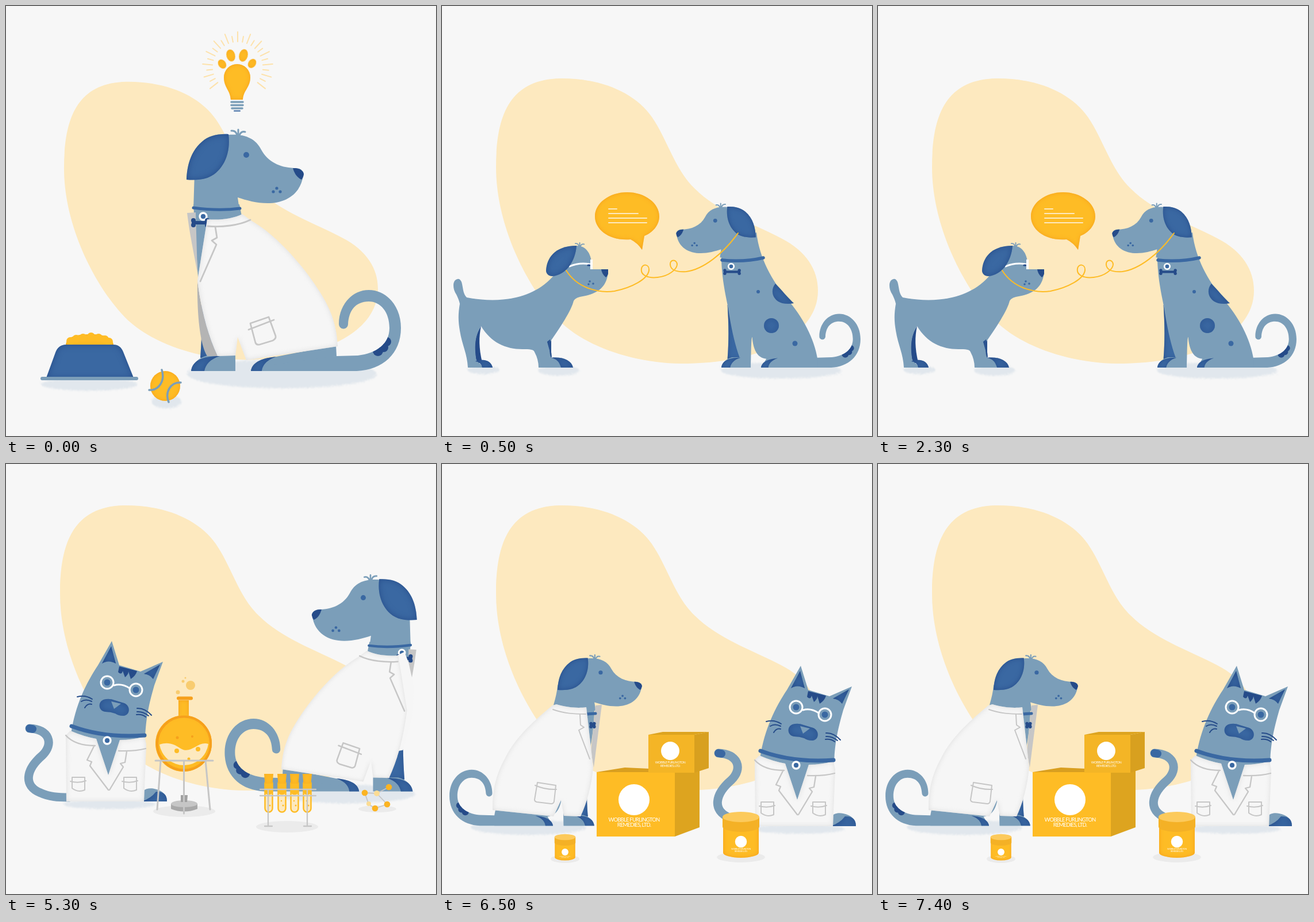
An HTML page for the animation above (8000 ms loop, 748 by 748 pixels).

```html
<!DOCTYPE html>
<html lang="en">
<head>
<meta charset="utf-8">
<title>Pets at work</title>
<style>
html, body { margin: 0; width: 100%; height: 100%; overflow: hidden; background: #f7f7f7; }
svg { display: block; width: 100vw; height: 100vh; }
text { font: 400 9.5px Lato, sans-serif; letter-spacing: -.8px; fill: #fff; text-anchor: middle; }
</style>
</head>
<body>
<svg id="stage" viewBox="0 0 748 748"></svg>
<script>
const BLUE = '#7b9eb9', DARK = '#3a68a2', NAVY = '#254b89', GOLD = '#febc25', AMBER = '#f6a01c',
      CREAM = '#fde9bf', WHITE = '#f6f6f6', GREY = '#c6c6c6', SHADE = '#e1e7ed';
const NIGHT = 'filter="url(#night)"', GLOW = 'filter="url(#glow)"', MIST = 'filter="url(#mist)"';

// Drawing helpers
const p = (d, fill, extra = '') => `<path d="${d}" fill="${fill}" ${extra}/>`;
const l = (d, color, w = 2, extra = '') =>
  `<path d="${d}" fill="none" stroke="${color}" stroke-width="${w}" stroke-linecap="round" stroke-linejoin="round" ${extra}/>`;
const e = (x, y, rx, ry, fill, extra = '') => `<ellipse cx="${x}" cy="${y}" rx="${rx}" ry="${ry}" fill="${fill}" ${extra}/>`;
const c = (x, y, r, fill, extra) => e(x, y, r, r, fill, extra);
const g = (transform, ...parts) => `<g transform="${transform}">${parts.join('')}</g>`;
const ground = (x, y, rx, ry) => e(x, y, rx, ry, SHADE, 'filter="url(#dust)"');

// Soft inner shading
const inner = (id, color, blur) => `<filter id="${id}" color-interpolation-filters="sRGB">
  <feFlood flood-color="${color}"/><feComposite in2="SourceAlpha" operator="out"/><feGaussianBlur stdDeviation="${blur}"/>
  <feComposite in2="SourceAlpha" operator="in" result="s"/>
  <feMerge><feMergeNode in="SourceGraphic"/><feMergeNode in="s"/></feMerge></filter>`;

const tailShape = 'M426 635H610C655 633 687 605 687 560C687 522 662 494 631 494C602 494 579 520 579 553A8 8 0 0 0 595 554C596 530 608 514 631 514C652 514 667 533 667 560C667 588 645 604 612 608L575 609L460 612C440 616 428 624 426 635Z';

const defs = `<defs>${inner('night', NAVY, 6)}${inner('glow', AMBER, 3.5)}${inner('mist', '#dcdcdc', 4)}
  <filter id="dust" x="-20%" y="-40%" width="140%" height="180%"><feTurbulence type="fractalNoise" baseFrequency=".7" result="n"/>
  <feDisplacementMap in="SourceGraphic" in2="n" scale="12"/><feGaussianBlur stdDeviation="1"/></filter>
  <clipPath id="tail"><path d="${tailShape}"/></clipPath></defs>`;

const blob = transform => p('M205 126C275 125 335 150 365 193C392 232 405 285 440 318C480 358 545 380 590 404C635 427 654 460 654 495C654 570 560 622 415 622C330 621 240 590 196 539C150 488 94 385 94 280C94 190 118 128 205 126Z',
  CREAM, `transform="${transform}"`);

const hair = l('M404 226V215M402 225Q400 216 392 217M406 225Q409 217 416 219', BLUE, 3);

const dogHead = hair
  + p('M326 354L328 290C335 250 350 226 387 224C415 222 434 230 444 250C456 272 478 282 506 282C514 283 519 289 517 295C512 328 486 343 455 343C436 343 418 338 403 333L406 354Z', BLUE)
  + p('M387 223C392 260 375 290 350 299C337 303 325 303 314 302C315 278 321 253 341 236C352 226 368 222 387 223Z', DARK, NIGHT)
  + p('M499 282C510 281 518 287 518 293Q517 299 514 302C506 298 502 292 499 282Z', NAVY)
  + c(418, 259, 5, DARK) + c(471, 317, 2.6, DARK) + c(465, 323, 2.6, DARK) + c(477, 323, 2.6, DARK);

const dogLegs = p(tailShape, BLUE)
  + `<g clip-path="url(#tail)">${c(662, 584, 8, NAVY)}${c(657, 594, 8, NAVY)}${c(647, 600, 9, NAVY)}</g>`
  + p('M338 470L352 530L385 612H338C342 560 341 520 338 470Z', DARK, NIGHT)
  + p('M350 608H399V635H322C324 622 335 612 350 608Z', BLUE);

const dogToes = p('M322 635C324 618 340 609 372 609C355 614 347 624 345 635Z', DARK, NIGHT)
  + p('M426 635C428 622 440 613 470 610C452 616 446 626 445 635Z', DARK, NIGHT);

const dogBody = p('M322 340L414 280C422 350 455 405 494 455C535 500 566 560 574 611V635H426L440 612C415 610 405 585 403 555C400 555 400 600 399 635H345L370 609C352 560 345 510 338 470C330 430 324 400 322 354Z', BLUE);

const bone = (x, y, w) => l(`M${x} ${y}h${w}`, NAVY, 6)
  + [0, w].map(d => c(x + d, y - 4, 4, NAVY) + c(x + d, y + 4, 4, NAVY)).join('');
const tag = (x, y, r) => c(x, y, r, 'none', `stroke="#fff" stroke-width="${r * .55}"`) + c(x, y, r * .65, DARK);

// Seated dog in a coat; the front is either an open lining or a closed flap
const coatDog = front => dogLegs + p('M575 609L574 590L455 613L460 625Z', BLUE) + dogToes + dogHead
  + p('M326 345H406L413 380L334 472Z', BLUE)
  + l('M326 351Q370 357 407 352', DARK, 5)
  + p('M315 360L330 359L333 464C326 425 320 400 315 360Z', GREY)
  + tag(343, 366, 6) + bone(326, 377, 24) + front
  + p('M350 371C372 373 395 370 411 362L426 373C470 398 515 450 541 490C566 527 575 555 577 592L418 616L403 576L399 608L368 609C350 570 340 530 333 478Z', WHITE, MIST)
  + l('M351 383C375 385 405 382 425 372M364 384L367 403L358 408L366 415L338 479', GREY, 2.8)
  + l('M425 552L434 586Q436 590 441 589L464 582Q470 579 469 574L457 541ZM422 563L466 546', GREY, 2.8);

const cat = ground(180, 592, 80, 8)
  + l('M41 460C75 461 84 487 63 507C34 532 30 560 60 572C75 579 90 580 110 580', BLUE, 15)
  + l('M41 460L46 461', DARK, 14)
  + p('M233 587C231 568 245 562 258 565C272 568 280 575 280 587Z', BLUE)
  + p('M236 587Q252 582 261 570Q280 569 280 587Z', DARK, NIGHT)
  + p('M113 470C120 420 140 380 160 350L184 308L197 350L234 361L273 344L258 385C248 420 244 440 242 475L180 545Z', BLUE)
  + p('M167 347L183 317L191 347Q178 340 167 347ZM240 365L268 349L256 374Q250 366 240 365Z', DARK, NIGHT)
  + p('M197 352L195 362Q201 368 203 360L207 371Q213 366 213 361L217 374Q226 368 228 360Z', NAVY)
  + [[176, 380], [226, 393]].map(([x, y]) => c(x, y, 5.5, DARK) + c(x, y, 11, 'none', 'stroke="#fff" stroke-width="3"')).join('')
  + l('M188 385Q201 381 215 390', '#fff', 3)
  + p('M174 409Q182 408 189 411L202 415C218 418 217 438 203 438Q196 438 190 434Q182 431 173 431C159 430 159 410 174 409Z', DARK, NIGHT)
  + p('M183 413L200 417L188 426Z', BLUE)
  + l('M150 409Q138 401 124 405M149 413Q139 408 131 413M149 418Q142 416 137 424', NAVY)
  + l('M228 425Q241 424 253 437M228 431Q238 430 248 438M227 436Q237 435 243 440', NAVY)
  + p('M104 472L112 464Q135 474 157 478L178 541L198 480Q220 480 241 474L244 488L240 587H105Z', WHITE, MIST)
  + l('M114 456Q170 477 241 472', DARK, 7) + tag(176, 481, 6)
  + l('M104 472Q120 490 155 490M153 491L141 515L149 518L146 525L178 567M243 495Q225 500 196 499M210 500L207 519L199 521L204 527L180 567', GREY, 2.3)
  + [113, 203].map(x => l(`M${x + 2} 545V564Q${x + 12} 572 ${x + 24} 567V545ZM${x - 1} 552Q${x + 13} 556 ${x + 26} 551`, GREY)).join('');

function rays() {
  let d = '';
  for (let i = 0; i < 25; i++) {
    const a = (-218 + i * 10.67) * Math.PI / 180, r = i % 2 ? 54 : 61;
    const at = k => (403 + k * Math.cos(a)).toFixed(1) + ' ' + (106 + k * Math.sin(a)).toFixed(1);
    d += `M${at(44)}L${at(r)}`;
  }
  return l(d, '#fde2ab', 2);
}

const toe = (x, y, rx, ry, turn) => e(x, y, rx, ry, GOLD, `transform="rotate(${turn} ${x} ${y})" ${GLOW}`);

const idea = blob('translate(9.3 9) scale(.975)')
  + ground(480, 640, 165, 25) + ground(145, 658, 84, 11) + ground(279, 688, 26, 12)
  + rays()
  + toe(376, 101, 6.5, 8.5, -35) + toe(391, 86, 7.5, 10.5, -15) + toe(413, 86, 7.5, 11, 15) + toe(428, 100, 6.5, 8.5, 35)
  + p('M379 124A23 23 0 0 1 425 124C425 142 413 146 412 163H391C390 146 379 142 379 124Z', GOLD, GLOW)
  + l('M392 167H412M392 172.500H412M393 178H411', BLUE, 3.6) + l('M397 182.500H407', DARK, 2)
  + coatDog(p('M333 478C332 540 338 590 350 609H368C350 570 340 530 333 478Z', '#b4b4b4'))
  + p('M104 590C105 575 122 571 148 571C172 571 186 578 187 590Z', GOLD, GLOW)
  + [[112, 583], [122, 579], [134, 577], [148, 575], [161, 577], [172, 580], [179, 584]].map(([x, y]) => c(x, y, 7, GOLD)).join('')
  + p('M70 647L86 603Q91 589 105 589H186Q199 589 204 602L222 647Z', DARK, NIGHT)
  + l('M63 648H227', BLUE, 6)
  + c(277, 661, 26, GOLD, GLOW) + l('M271 633C277 652 266 669 249 668M304 655C286 654 276 672 283 689', BLUE, 3.5);

const pup = ground(72, 633, 28, 7) + ground(203, 634, 36, 9)
  + g('translate(-19 283) scale(.64 .6)', hair)
  + p('M68 557C55 575 55 600 61 622L70 620C64 595 64 575 68 557ZM178 580L190 575V618L182 608Z', NAVY)
  + p('M27 475C19 476 17 490 25 502C29 510 30 514 31 518C28 535 28 548 31 565C35 590 44 605 45 629H72C66 620 60 620 59 612C56 590 58 572 68 557C85 585 110 597 140 597C153 597 159 597 161 602Q168 615 168 629H207Q205 613 190 612C186 605 188 594 187 586C205 560 225 530 229 513C233 506 242 506 250 504C276 498 289 484 289 458H261C261 432 252 417 234 417L195 468C160 510 100 518 43 507C36 500 37 490 34 480Q31 474 27 475Z', BLUE)
  + p('M183 584Q188 602 191 613L188 580ZM61 617C75 613 86 618 88 629H70Q68 619 58 618ZM190 612C210 610 225 616 228 629H207C204 618 199 614 190 612Z', DARK, NIGHT)
  + p('M277 458H289V466Q287 471 285 472Q278 466 277 458Z', NAVY)
  + c(257, 479, 1.8, DARK) + c(263, 483, 1.8, DARK) + c(255, 484, 1.8, DARK)
  + l('M222 453Q238 446 257 449', '#fff', 3) + l('M254 451H257', NAVY, 3) + p('M258 441h4v17h-4Z', '#fff')
  + p('M234 417C232 445 215 468 192 470C186 470 181 466 181 460C182 440 195 417 234 417Z', DARK, NIGHT);

const chat = blob('') + ground(590, 634, 105, 14) + pup
  + g('translate(272.5 208) scale(.663)', dogLegs, dogBody, dogToes)
  + c(573, 556, 13, DARK, NIGHT) + c(550, 497, 3, DARK) + c(614, 587, 4.5, DARK)
  + p('M580 483C570 495 575 512 592 517Q602 519 612 517C602 508 590 493 580 483Z', DARK, NIGHT)
  + g('translate(759.500 198.5) scale(-.68 .675)', dogHead)
  + l('M487 442Q525 446 559 438', DARK, 5.5)
  + g('translate(272.5 208) scale(.663)', bone(331, 384, 38)) + tag(503, 453, 4.8)
  + l('M216 460C235 490 270 500 300 496C330 490 358 475 360 460C361 448 348 448 347 457C345 468 358 474 375 472C395 470 408 458 409 450C409 440 396 440 397 450C398 460 410 463 425 462C455 458 490 430 515 395', GOLD)
  + p('M328 406Q340 412 348 424L352 400C367 394 378 381 378 366C378 343 353 324 322 324S266 343 266 366S291 409 328 406Z', GOLD, GLOW)
  + l('M290 353H304M290 361H341M290 369H356M290 377H356', CREAM);

const tube = x => p(`M${x - 6.5} 555V599A6.500 6.500 0 0 0 ${x + 6.5} 599V555Z`, CREAM, `stroke="${GOLD}" stroke-width="2.500"`)
  + p(`M${x - 6} 555h12v18q-6 5 -12 0Z`, GOLD) + p(`M${x - 8} 539h16l-1.500 17h-13Z`, GOLD, GLOW)
  + c(x - 1, 586, 1.2, GOLD) + c(x + 2, 594, 1.5, GOLD);

const lab = blob('translate(0 -54)')
  + ground(590, 574, 122, 16) + cat
  + g('translate(996 .500) scale(-.896 .896)',
      coatDog(p('M352 371L338 364L330 385L320 430L322 488L341 555L370 560Z', WHITE)))
  + e(310, 604, 54, 10, '#ebebeb') + e(489, 631, 54, 10, '#ebebeb') + e(646, 600, 33, 6, '#ebebeb')
  + p('M287 591V600Q310 609 333 600V591Z', '#a9a9a9') + e(310, 591, 23, 6, GREY) + p('M304 576H316L315 588H304Z', '#a0a0a0')
  + p('M300 411H318V438A49 49 0 1 1 300 438Z', GOLD, GLOW) + l('M300 407.500H322', AMBER, 6)
  + c(309.5, 486, 46.5, 'none', `stroke="${AMBER}" stroke-width="4"`)
  + p('M267 488C282 483 292 487 304 495C322 506 334 481 352 487A43 43 0 0 1 267 488Z', CREAM)
  + c(297, 499, 4, GOLD) + c(334, 496, 4, GOLD) + c(318, 513, 2.5, GOLD) + c(298, 476, 2.5, AMBER) + c(324, 474, 2, AMBER)
  + c(321, 385, 8, '#f8cc70') + c(299, 397, 3.5, '#f8cc70') + c(308, 378, 2.5, '#f8cc70') + c(312, 372, 1.5, '#f8cc70')
  + l('M260 516H360M269 516L263 601M309.500 516V608M347 516L355 601', GREY, 3)
  + [457, 480, 502, 524].map(tube).join('')
  + l('M442 566H539M442 577H539M456 566V630M524 566V630M450 630H463M518 630H531', GREY, 2.3)
  + l('M624 572L645 573L666 562M645 573L663 592L642 599L631 592L624 572', GREY, 1.8)
  + [[624, 572], [666, 562], [663, 592], [642, 599]].map(([x, y]) => c(x, y, 5.3, GOLD, GLOW)).join('')
  + c(645, 573, 5, '#fbdc94') + c(631, 591, 4, '#fbdc94');

const label = (x, y, s) => g(`translate(${x} ${y}) scale(${s})`, c(0, 0, 27, '#fff'),
  '<text y="38">WOBBLE FURLINGTON</text><text y="47">REMEDIES, LTD.</text>');

const jar = g('', p('M-31 0V62A31 9 0 0 0 31 62V0Z', GOLD, GLOW)
  + p('M-32 0V17A32 9 0 0 0 32 17V0Z', '#f4b126') + e(0, 0, 32, 9, '#fcca5c'));

const parcel = blob('translate(0 -54)')
  + ground(150, 632, 100, 13)
  + g('translate(487 191) scale(-.69 .69)', dogLegs, dogBody, dogToes)
  + g('translate(-25 181.5) scale(.72 .7)', dogHead)
  + p('M267 420L278 419L264 528L259 500Z', GREY)
  + l('M252 435L267 434', DARK, 5)
  + g('translate(248 420) scale(.7)', bone(16, 49, 8))
  + p('M192 420L199 418C220 424 238 425 251 423L263 528C260 560 252 590 241 613L212 612L207 585L194 613L88 602C88 570 92 545 108 515C125 480 150 455 192 420Z', WHITE, MIST)
  + l('M193 427C212 434 230 435 250 435M240 436L241 454L247 458L238 463L257 513', GREY)
  + l('M166 554L161 584Q161 587 165 588L190 591Q194 591 195 587L198 559ZM162 559Q180 567 199 566', GREY)
  + g('translate(440 43)', cat)
  + p('M269 536L318 528L448 534L405 537Z', '#d99f20') + p('M405 536.500L448 533V632L405 648Z', '#dda41f') + p('M269 536H405V648H269Z', GOLD)
  + p('M359 471L384 466H464L439 471Z', '#dda41f') + p('M439 471L464 466V529L439 537Z', '#d8a01f') + p('M359 471H439V537H359Z', '#f4b526')
  + label(334, 584, 1) + label(397, 499, .59)
  + e(520, 684, 42, 9, '#ebebeb') + e(214, 687, 25, 7, '#ebebeb')
  + g('translate(520 614)', jar) + label(520, 657, .38)
  + g('translate(214 649) scale(.57)', jar) + label(214, 675, .22);

const stage = document.getElementById('stage');
stage.innerHTML = defs + [idea, chat, lab, parcel].map(s => `<g class="scene" display="none">${s}</g>`).join('');
const scenes = [...stage.querySelectorAll('.scene')];
const ends = [500, 3500, 6500, 8000];

function draw() {
  const time = performance.now() % 8000, current = ends.findIndex(end => time < end);
  scenes.forEach((scene, i) => scene.setAttribute('display', i === current ? 'inline' : 'none'));
  requestAnimationFrame(draw);
}
draw();
</script>
</body>
</html>
```
